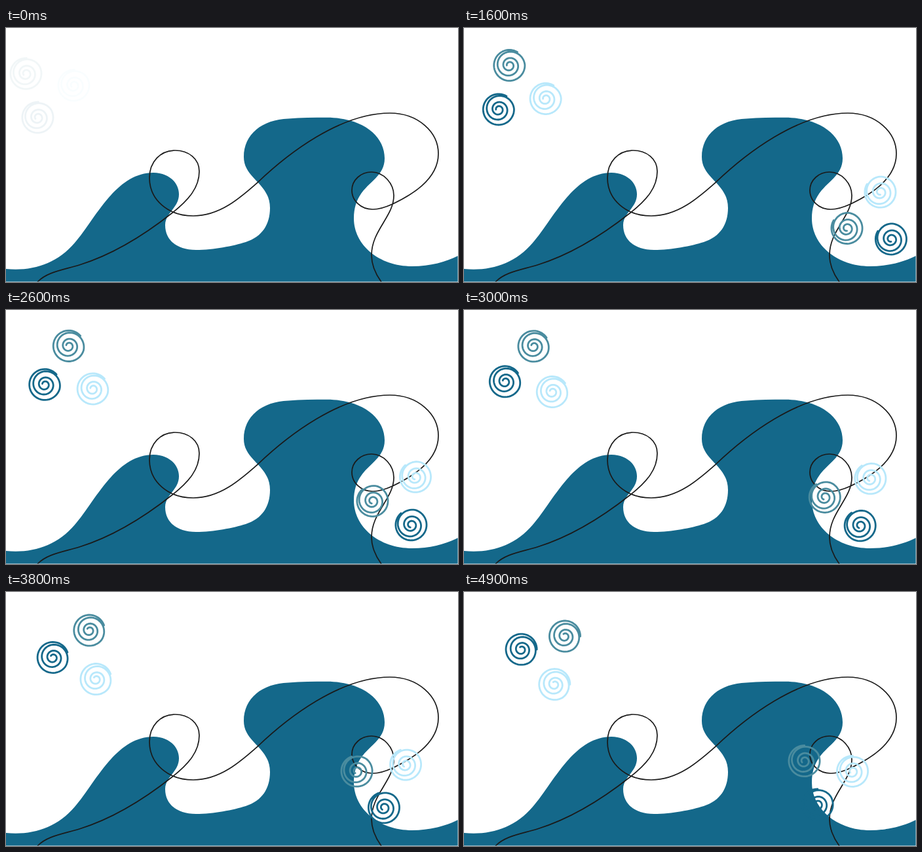
An HTML page that plays this animation: 690x388 px, repeating every 5 s.

```html
<!DOCTYPE html>
<html lang="en">
<head>
<meta charset="utf-8">
<title>Waves and spirals</title>
<style>
  html, body { margin: 0; width: 100%; height: 100%; overflow: hidden; background: #fff; }
  svg { display: block; width: 690px; height: 388px; }
  path { fill: none; }
</style>
</head>
<body>
<svg viewBox="0 0 690 388">
  <defs>
    <clipPath id="stage"><rect width="689.6" height="387.6"/></clipPath>
    <path id="spiral" stroke-width="2.8" stroke-linecap="round" stroke-linejoin="round"/>
    <g id="trio">
      <use href="#spiral" x="-16.8" y="33.2" stroke="#14688a"/>
      <use href="#spiral" x="-34.8" y="-33.8" stroke="#4a8c9f"/>
      <use href="#spiral" x="38.2" y="-15.8" stroke="#b8e8fb"/>
    </g>
  </defs>
  <g clip-path="url(#stage)">
    <path style="fill:#14688a" d="M0 368C40 372 78 360 105 328C135 294 167 221 225 221C248 221 264 236 264 254
      C264 275 243 282 243 301C243 325 262 339 290 339C317 339 347 333 366 327C391 319 403 300 403 275
      C403 237 363 230 363 197C363 162 391 140 431 138.5C450 137 470 136.8 490 136.8C545 137 578 165 578 199
      C578 237 531 237 531 291C531 331 569 364 620 364C648 364 672 357 690 348V388H0Z"/>
    <path stroke="#1a1a1a" stroke-width="1.7" d="M48 388C62 373 85 370 112 362C160 347 205 321 253 283
      C280 262 295 243 295 219C295 200 279 187 258 187C236 187 219 204 219 229C219 262 247 287 286 287
      C327 287 358 259 384 236C430 192 510 130 586 130C629 130 660 159 660 192C660 233 615 257 590 269
      C579 274 570 277 560 277C541 277 528 263 528 248C528 232 542 220 558 220C577 220 592 238 592 256
      C592 288 558 309 558 347C558 364 565 377 573 388"/>
  </g>
  <use id="left" href="#trio"/>
  <use id="right" href="#trio"/>
</svg>
<script>
const el = id => document.getElementById(id);

// The coil widens with each turn until the last loop closes on itself.
const points = [];
for (let turn = 0; turn <= 3.35; turn += 0.02) {
  const r = Math.min(23.6, 4 + 3.6 * turn + 1.7 * turn * turn);
  const a = (150 + 360 * turn) * Math.PI / 180;
  points.push((r * Math.cos(a)).toFixed(2) + ' ' + (r * Math.sin(a)).toFixed(2));
}
el('spiral').setAttribute('d', 'M' + points.join('L'));

function place(id, transform, opacity) {
  el(id).setAttribute('transform', transform);
  el(id).setAttribute('opacity', Math.min(1, opacity));
}

function draw(now) {
  const t = Math.floor(now % 5000 / 100) / 10; // ten steps per second
  const turn = 18 * t;
  place('left', `translate(${65.2 + 11.45 * t} 103.4) rotate(${turn})`, 0.07 + 1.6 * t);
  place('right', `translate(${658.6 - 19.9 * t} 282.6) rotate(${turn - 90}) translate(-6 8)`, 1.6 * t);
}

let start;
function loop(now) {
  start ??= now;
  draw(now - start);
  requestAnimationFrame(loop);
}
draw(0);
requestAnimationFrame(loop);
</script>
</body>
</html>
```
